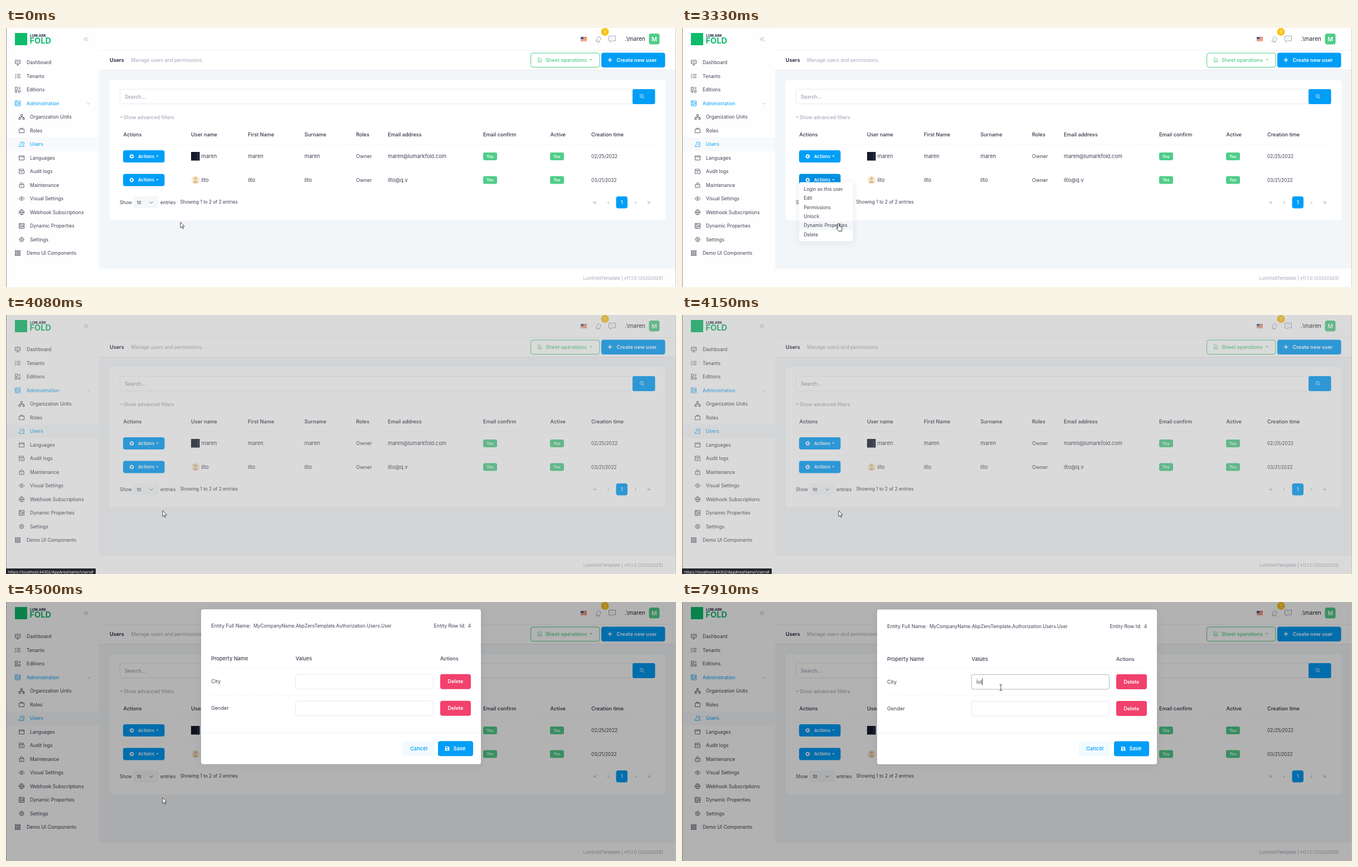
An HTML page that plays this animation: 1202x466 px, repeating every 8000 ms.

```html
<!DOCTYPE html>
<html lang="en">
<head>
<meta charset="utf-8">
<title>User list with dynamic properties</title>
<style>
html, body { margin: 0; width: 100%; height: 100%; overflow: hidden; background: #fff; }
svg { display: block; width: 1202px; height: 466px; font-family: Inter, "Open Sans", sans-serif; }
text { white-space: pre; }
</style>
</head>
<body>
<svg id="stage" viewBox="0 0 1202 466"></svg>
<script>
const BLUE = '#009ef7', GREEN = '#50cd89', RED = '#f1416c', INK = '#3f4254', GREY = '#a1a5b7', LINE = '#e4e6ef';

// Drawing helpers; text is placed by its vertical middle
const text = (x, y, s, size = 8.6, fill = INK, weight = 400, anchor = 'start') =>
  `<text x="${x}" y="${y + size * 0.363}" font-size="${size}" fill="${fill}" font-weight="${weight}" text-anchor="${anchor}">${s}</text>`;
const box = (x, y, w, h, fill, r = 0, more = '') =>
  `<rect x="${x}" y="${y}" width="${w}" height="${h}" rx="${r}" fill="${fill}" ${more}/>`;
const icon = (x, y, d, color = INK, fill = 'none', width = 0.8) =>
  `<path transform="translate(${x} ${y})" d="${d}" fill="${fill}" stroke="${color}" stroke-width="${width}"/>`;
const dot = (x, y, r, fill) => `<circle cx="${x}" cy="${y}" r="${r}" fill="${fill}"/>`;
const rule = (x1, x2, y, dash = '2 1.5') =>
  `<path d="M${x1} ${y}H${x2}" stroke="#eceef2" stroke-width=".8" stroke-dasharray="${dash}"/>`;
const group = (id, body, more = '') => `<g id="${id}" ${more}>${body}</g>`;
const frame = (x, y, w, h, id = '') => box(x, y, w, h, '#fff', 4, `stroke="${LINE}" stroke-width=".9" id="${id}"`);
const caretDown = (x, y, color) => icon(x, y, 'M-2.2 -1.1H2.2L0 1.3Z', 'none', color);

const circle = 'M-4.5 0a4.5 4.5 0 1 0 9 0a4.5 4.5 0 1 0-9 0';
const sliders = 'M-4.5 -4.5h9v9h-9zM-4.5 -1.5h9M-4.5 1.5h9M-2 -4.5v3M2 -1.5v3M-1 1.5v3';
const nav = [
  ['Dashboard', 'M-4.5 -4h9v6h-9zM-2 4.5h4M0 2v2M-3 0l2-2l2 1.5l2-2'],
  ['Tenants', 'M-5 -3l1 1l1.5-2M-1 -3h6M-5 0l1 1l1.5-2M-1 0h6M-5 3l1 1l1.5-2M-1 3h6'],
  ['Editions', 'M-4.5 -4.5h4v4h-4zM-4.5 1.5h3v3h-3zM1.5 -4h3.5M1.5 -1.5h3.5M1 1.5h3.5v3h-3.5z'],
  ['Administration', sliders],
  ['Organization Units', 'M-1.5 -4.5h3v3h-3zM0 -1.5v2M-4 2v-1.5h8v1.5M-5 2h3v2.5h-3zM2 2h3v2.5h-3z'],
  ['Roles', 'M-4.5 -2.5h9v6.5h-9zM-2 -2.5v-1.7h4v1.7'],
  ['Users', 'M-4.8 4.2v-1.7l2.5-1.5v-4q2-2.5 4 0v4l2.7 1.5v1.7zM2 -3.5q2.5-.5 2.5 2v2'],
  ['Languages', 'M-4.5 -3.5h9v7.5h-9zM-4.5 -1.5h9'],
  ['Audit logs', 'M-4.5 -4h8v2.5h-8zM-4.5 -1.5v5.5h9v-5.5M-2 1h4'],
  ['Maintenance', 'M-4 -1h8v5.5h-8zM-2.3 -1v-2q2.3-3 4.6 0v2M0 1v2'],
  ['Visual Settings', 'M-5 0q5-6.5 10 0q-5 6.5-10 0M-1.3 0a1.3 1.3 0 1 0 2.6 0a1.3 1.3 0 1 0-2.6 0'],
  ['Webhook Subscriptions', circle + 'M-4.5 0h9M0 -4.5q-4 4.5 0 9q4-4.5 0-9'],
  ['Dynamic Properties', sliders],
  ['Settings', 'M-3.3 0a3.3 3.3 0 1 0 6.6 0a3.3 3.3 0 1 0-6.6 0M-1 0a1 1 0 1 0 2 0a1 1 0 1 0-2 0M0 -5v1.7M0 5v-1.7M-5 0h1.7M5 0h-1.7M-3.5 -3.5l1.2 1.2M3.5 3.5l-1.2-1.2M-3.5 3.5l1.2-1.2M3.5 -3.5l-1.2 1.2'],
  ['Demo UI Components', [-3.5, 0, 3.5].map(y => [-3.5, 0, 3.5].map(x => `M${x - 1} ${y - 1}h2v2h-2z`).join('')).join('')]
];

function sidebar() {
  const rows = nav.map(([label, d], i) => {
    const y = 62 + 24.5 * i, sub = i > 3 && i < 14, color = i === 3 || i === 6 ? BLUE : INK;
    return icon(sub ? 28 : 21, y, d, color) + text(sub ? 43 : 37, y, label, 8.6, color);
  }).join('');
  return box(0, 0, 167, 466, '#fefefe') + box(0, 197, 167, 24.5, '#f7f9fb') +
    box(16, 9, 22, 22, '#0dbb6b') + text(43, 13.5, 'LUM.ARK', 6.2, '#182440', 700) +
    text(42.5, 22.5, 'FOLD', 14.5, '#0dbb6b', 700) +
    icon(144, 20, 'M-.5 -3.5L-4 0L-.5 3.5M3.5 -3.5L0 0L3.5 3.5', '#8a8fa3') +
    icon(148, 136, 'M-2.5 -1.2L0 1.3L2.5 -1.2', GREY) + rows;
}

function header() {
  return box(167, 0, 1035, 75, '#fff') + box(167, 75, 1035, 2, '#edf0f4') + rule(167, 1202, 40.5, '0') +
    box(1031, 16, 11, 7.5, '#e8673f') + box(1031, 16, 5, 4, '#3b62a8') + box(1036, 18, 6, 1, '#fff') + box(1031, 21, 11, 1, '#fff') +
    icon(1063, 20, 'M-5 3q2.5-2 2.5-5q2-4 5-1.5q3 2 .5 5q-2 2-1 4zM-3 3.6q.5 3 3 .9', GREY, 'none', 1) +
    icon(1087.5, 19.5, 'M-6 -5h12v8.5h-7l-2.5 2.5v-2.5h-2.5zM-3 -1h1M-.5 -1h1M2 -1h1', GREY, 'none', 1) +
    dot(1074.5, 7, 7, '#f9c31c') + text(1074.5, 7, '1', 7.5, '#fff', 500, 'middle') +
    text(1110, 19.5, '.\\maren', 10.2, '#222536') + box(1153.5, 10, 19, 19.5, GREEN, 4) +
    text(1163, 20, 'M', 10.5, '#fff', 600, 'middle') +
    text(186, 57.5, 'Users', 9.1, '#181c32', 600) + text(224.5, 57.5, 'Manage users and permissions.', 8.6, GREY) +
    box(941.5, 45, 123.5, 25.5, '#fff', 4, `stroke="${GREEN}"`) +
    icon(957.5, 57.5, 'M-2.8 -3.7h3.5l2.2 2.2v5.2h-5.7zM-1.3 .2h2.6M-1.3 2h2.6', GREEN) +
    text(968, 57.5, 'Sheet operations', 9.1, GREEN, 500) + caretDown(1049.5, 57, GREEN) +
    box(1068, 44.5, 114.5, 26.5, BLUE, 4) + icon(1083.5, 57.5, 'M-3.7 0h7.4M0 -3.7v7.4', '#fff', 'none', 1.5) +
    text(1095.5, 57.5, 'Create new user', 9.1, '#fff', 600);
}

const gear = 'M-2.5 0a2.5 2.5 0 1 0 5 0a2.5 2.5 0 1 0-5 0M0 -4v2M0 4v-2M-4 0h2M4 0h-2M-2.7 -2.7l1 1M2.7 2.7l-1-1M-2.7 2.7l1-1M2.7 -2.7l-1 1';

function userRow(y, id, name, mail, date) {
  const badge = x => box(x, y - 7, 25, 14, GREEN, 3) + text(x + 12.5, y, 'Yes', 7, '#fff', 600, 'middle');
  return box(210, y - 11, 74.5, 22, BLUE, 4, `id="${id}"`) + icon(225.5, y, gear, '#fff', 'none', 1.5) +
    text(237, y, 'Actions', 7.9, '#fff', 600) + caretDown(271.5, y - 0.5, '#fff') +
    text(350.5, y, name, 9.3) + text(434, y, name, 9.3) + text(535.5, y, name, 9.3) +
    text(628, y, 'Owner', 9.1) + text(685, y, mail, 9.3) + badge(856) + badge(976) + text(1050, y, date, 8.4);
}

function card() {
  const heads = [[210.5, 'Actions'], [332, 'User name'], [434, 'First Name'], [535.5, 'Surname'], [628, 'Roles'],
    [685, 'Email address'], [856, 'Email confirm'], [976.5, 'Active'], [1050, 'Creation time']];
  const arrow = (x, d) => icon(x, 314, d, '#7e8299');
  return box(186, 94, 997, 252, '#fff', 5) + frame(204.5, 110, 924, 26.5) +
    text(213, 123.5, 'Search...', 9, '#8f93a6') + box(1124, 110, 40.5, 27, BLUE, 3) +
    icon(1141, 123, 'M-3.5 -.7a2.8 2.8 0 1 0 5.6 0a2.8 2.8 0 1 0-5.6 0M1.5 1.5l2.5 2.5', '#fff', 'none', 0.9) +
    icon(207, 160.5, 'M-2 -1L0 1L2 -1', '#7e8299', 'none', 1) + text(211, 161, 'Show advanced filters', 8.6, '#9a9eb0') +
    heads.map(([x, s]) => text(x, 192, s, 9.1, '#2f3244', 500)).join('') +
    rule(210, 1164, 210) + rule(210, 1164, 252) +
    box(332, 223, 15.5, 15.5, '#171a2b') + box(343, 225, 2, 12, '#29335a') +
    dot(340, 273.5, 7.3, '#f3ead9') + dot(340, 271, 2.7, '#e5be85') + icon(340, 278, 'M-4.3 1q0-4 4.3-4q4.3 0 4.3 4z', 'none', '#e5be85') +
    userRow(231, 'row1', 'maren', 'maren@lumarkfold.com', '02/25/2022') +
    userRow(273.5, 'row2', 'lito', 'lito@q.v', '03/21/2022') +
    text(204, 313.5, 'Show', 8.3) + box(228, 303, 46, 21.5, '#f5f8fa', 4) + text(234.5, 314, '10', 7.6, INK, 500) +
    icon(260.5, 314, 'M-3 -1.6L0 1.6L3 -1.6') + text(277, 313.5, 'entries', 8.5) +
    text(312.5, 313.5, 'Showing 1 to 2 of 2 entries', 8.25) +
    arrow(1056, 'M0 -2L-2 0L0 2M2.5 -2L.5 0L2.5 2') + arrow(1080.5, 'M1 -2L-1 0L1 2') +
    box(1094.5, 303, 20.5, 21.5, BLUE, 4) + text(1104.7, 314, '1', 8.6, '#fff', 500, 'middle') +
    arrow(1129.5, 'M-1 -2L1 0L-1 2') + arrow(1153.5, 'M0 -2L2 0L0 2M-2.5 -2L-.5 0L-2.5 2');
}

function menu() {
  const items = ['Login as this user', 'Edit', 'Permissions', 'Unlock', 'Dynamic Properties', 'Delete'];
  return box(210, 277.5, 96.5, 106, '#fff', 4, 'filter="url(#soft)"') + box(210, 282, 96.5, 16.3, '#f3f5f8', 0, 'id="hover"') +
    items.map((s, i) => text(218.5, 290 + 16.3 * i, s, 8.45)).join('');
}

function modal() {
  const prop = (y, name, id) => text(368, y, name, 9.1) + frame(519.5, y - 13, 247, 26.5, id) +
    box(779, y - 13.5, 55, 27, RED, 4) + text(806.5, y, 'Delete', 9, '#fff', 600, 'middle');
  return box(350, 13.5, 502, 278.5, '#fff', 4, 'filter="url(#soft)"') +
    text(368, 43.5, 'Entity Full Name:', 9) +
    text(444, 43.5, 'MyCompanyName.AbpZeroTemplate.Authorization.Users.User', 8.4) +
    text(767.5, 43.5, 'Entity Row Id:', 8.8) + text(828.5, 43.5, '4', 8.6) +
    text(368, 102.5, 'Property Name', 9.2, INK, 500) + text(519.5, 102.5, 'Values', 9.2, INK, 500) +
    text(779, 102.5, 'Actions', 9, INK, 500) + rule(368, 834, 119.5) + rule(368, 834, 168) +
    prop(143.5, 'City', 'city') + prop(191.5, 'Gender', 'gender') + rule(350, 852, 236, '0') +
    box(711.5, 250.5, 58, 27, '#f1faff', 4) + text(740.5, 264, 'Cancel', 9.4, BLUE, 500, 'middle') +
    box(775, 250.5, 63, 27, BLUE, 4) + icon(791.5, 264, 'M-3.7 -3.7h6l1.5 1.5v6h-7.5z', 'none', '#fff') +
    box(789.2, 261.5, 4, 1.8, BLUE) + dot(791.5, 265.7, 1.2, BLUE) + text(802.5, 264, 'Save', 9.3, '#fff', 600) +
    group('typed', '') + box(528, 137.5, 0.9, 12, '#222', 0, 'id="caret"');
}

const stage = document.getElementById('stage');
stage.innerHTML =
  '<defs><filter id="soft" x="-20%" y="-20%" width="140%" height="140%"><feDropShadow dx="0" dy="2" stdDeviation="6" flood-color="#404860" flood-opacity=".13"/></filter></defs>' +
  box(0, 0, 1202, 466, '#f3f6f9') + sidebar() + header() + card() +
  box(167, 433, 1035, 33, '#fefefe') + text(1178.5, 450.5, 'LumFoldTemplate | v11.1.0 [20220325]', 7.9, GREY, 400, 'end') +
  group('menu', menu()) +
  box(0, 0, 1202, 466, '#8c8c8c', 0, 'id="busy"') + box(0, 0, 1202, 466, '#000', 0, 'id="dim"') +
  group('modal', modal()) +
  box(0, 0, 0.8, 466, '#777') + box(1201.3, 0, 0.7, 466, '#bbb') +
  group('tip', box(0, 456, 161, 10, '#26272b', 1) +
    text(4, 462.5, 'https://localhost:44302/AppAreaName/Users#', 7.1, '#fff'), 'font-family="Open Sans, sans-serif"') +
  group('click', dot(-1, 1, 7.5, '#7cc142'), 'opacity=".85"') +
  group('arrow', icon(0, 0, 'M0 0V10.5L2.4 8.3L4 12L5.6 11.3L4 7.7H7.2Z', '#222', '#fff')) +
  group('hand', icon(0, 0, 'M-1.5 1a1.4 1.4 0 0 1 2.8 0V5l4 .9q1.2 .4 1 1.8l-.7 5.8h-5.6l-3.6-4.6q-.6-1.2 .8-1.4l1.3 1z', '#222', '#fff', 0.9)) +
  group('beam', icon(0, 0, 'M-2.5 -5.3h1.5q1 0 1 1q0-1 1-1h1.5M0 -4.3V4.3M-2.5 5.3h1.5q1 0 1-1q0 1 1 1h1.5', '#222'));

const el = {};
stage.querySelectorAll('[id]').forEach(e => { el[e.id] = e; });
const set = (id, name, value) => el[id].setAttribute(name, value);
const show = (id, opacity) => set(id, 'opacity', +opacity);
const clamp = v => Math.max(0, Math.min(1, v));

// Pointer stops: time, x, y
const stops = [[0, 313, 349], [460, 313, 349], [1090, 273, 272], [2210, 273, 272], [2660, 240, 312], [3050, 280, 343],
  [3330, 281, 352], [5040, 281, 352], [5590, 536, 182], [5870, 573, 155], [5940, 574, 154],
  [6199, 574, 154], [6200, 567, 155], [6459, 567, 155], [6460, 572, 154], [8000, 572, 154]];

function pointer(t) {
  const i = stops.findIndex((s, k) => k && t <= s[0]), [t0, x0, y0] = stops[i - 1], [t1, x1, y1] = stops[i];
  const p = (t - t0) / (t1 - t0), k = p * p * (3 - 2 * p);
  return [x0 + (x1 - x0) * k, y0 + (y1 - y0) * k];
}

// The screen refreshes every 70 ms while something moves
function refresh(t) {
  if (t >= 5940) return t;
  const base = t < 3600 ? 530 : t < 5000 ? 3730 : 5590;
  return Math.max(0, base + Math.floor((t - base) / 70) * 70);
}

function draw(time) {
  const t = time % 8000, q = refresh(t), [x, y] = pointer(q);
  const open = t >= 1750 && t < 3800, onButton = t < 1750 && y < 284;
  const kind = q > 5800 ? 'beam' : open || onButton ? 'hand' : 'arrow';
  for (const k of ['arrow', 'hand', 'beam', 'click']) set(k, 'transform', `translate(${x} ${y})`);
  for (const k of ['arrow', 'hand', 'beam']) show(k, k === kind);
  show('click', (t >= 1550 && t < 1750) || (t >= 3730 && t < 3800) ? 0.85 : 0);

  set('row2', 'fill', open || onButton ? '#0090e2' : BLUE);
  show('menu', open ? (t < 1820 ? 0.5 : 1) : 0);
  const item = Math.floor((y - 282) / 16.3);
  show('hover', item >= 0);
  set('hover', 'y', 282 + 16.3 * Math.max(0, item));
  show('tip', clamp(Math.min((q - 3390) / 140, (4430 - q) / 140)));

  show('busy', 0.32 * clamp(Math.min((q - 3800) / 140, (4290 - q) / 140)));
  show('dim', 0.3 * clamp((q - 4150) / 150));
  const p = clamp((q - 4225) / 300);
  show('modal', clamp((q - 4225) / 150));
  set('modal', 'transform', `translate(0 ${-50 * (1 - p) ** 2})`);
  set('city', 'stroke', t >= 4570 ? '#a9adbd' : LINE);

  const n = [7120, 7650, 7910].filter(k => t >= k).length;
  const lit = n || (t >= 4640 && t < 5150) || (t >= 5680 && t < 6200) || t >= 6720;
  el.typed.innerHTML = text(528, 143.5, 'İst'.slice(0, n), 9);
  set('caret', 'x', [528, 530.5, 535.2, 538.3][n]);
  show('caret', !!lit);
}

const loop = () => { draw(performance.now()); requestAnimationFrame(loop); };
loop();
</script>
</body>
</html>
```
